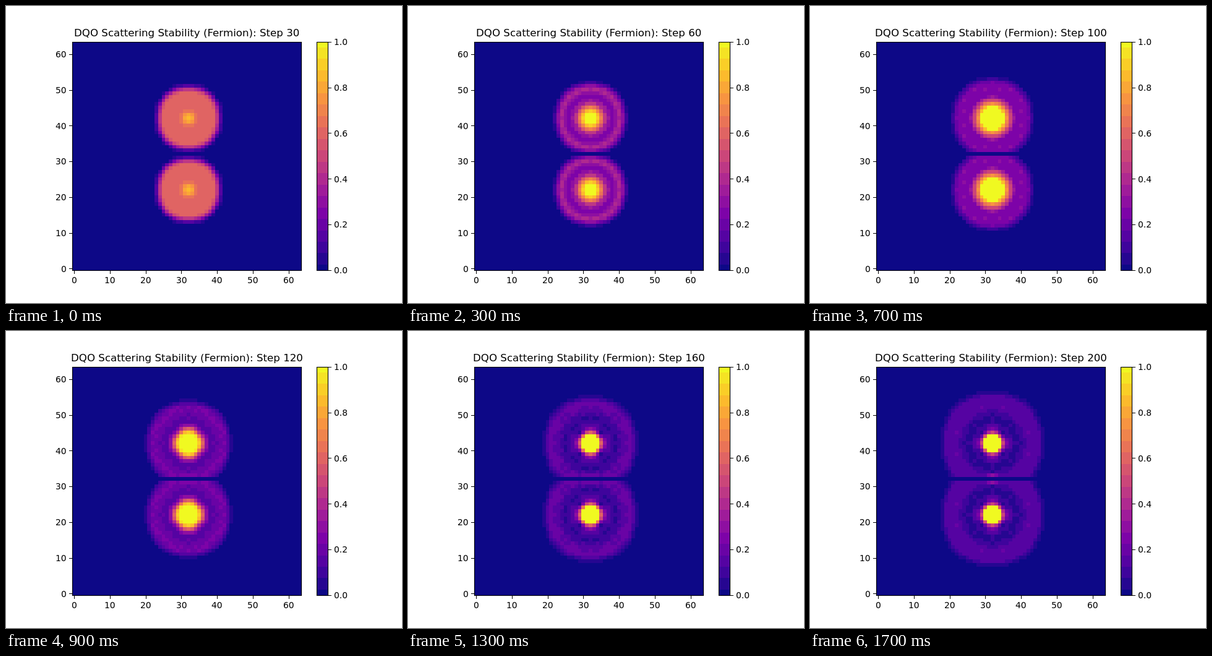
These frames come from a looping animation (640x480 px, 1.8 s). An HTML page with a canvas:

```html
<!DOCTYPE html>
<html lang="en">
<head>
<meta charset="utf-8">
<title>Scattering stability</title>
<style>
  html, body { margin: 0; width: 100%; height: 100%; overflow: hidden; background: #fff; }
  canvas { display: block; }
</style>
</head>
<body>
<canvas id="stage" width="640" height="480"></canvas>
<script>
const ctx = document.getElementById('stage').getContext('2d');
const LOOP = 1800, HOLD = 100, N = 64, LEVELS = 20;
const LEFT = 107.2, SIZE = 369.6, BOTTOM = 427.2;
const FONT = '"DejaVu Sans", sans-serif';

const PLASMA = ['0d0887', '4b03a1', '7d03a8', 'a82296', 'cb4679', 'e56b5d', 'f89441', 'fdc328', 'f0f921']
  .map(hex => [0, 2, 4].map(i => parseInt(hex.slice(i, i + 2), 16)));

const clamp = v => Math.min(1, Math.max(0, v));
const smooth = v => clamp(v) ** 2 * (3 - 2 * clamp(v));
const bell = v => Math.exp(-v * v);

function colour(value) {
  const v = Math.round(clamp(value) * LEVELS) / LEVELS * (PLASMA.length - 1);
  const i = Math.min(PLASMA.length - 2, Math.floor(v));
  return `rgb(${PLASMA[i].map((c, n) => Math.round(c + (PLASMA[i + 1][n] - c) * (v - i)))})`;
}

// The core swells quickly and shrinks slowly while the outer disc spreads and fades.
function poseAt(step) {
  const age = (step - 30) / 170;
  const u = Math.max(0, (step - 45) / 40);
  const swell = (u * Math.exp(1 - u)) ** 3;
  const late = clamp((step - 100) / 40);
  return {
    peak: .6 + .009 * step,
    core: 2.95 + 2.5 * swell,
    disc: .16 + .44 * Math.exp((30 - step) / 50),
    edge: 10 + 5.2 * age,
    moat: .65 * (1 - swell) * clamp((step - 30) / 30),
    moatRadius: 6 + age,
    moatWidth: 1 + 1.5 * age,
    ripple: .025 * clamp(age * 3),
    flare: .1 * late,
    contact: .2 * late * Math.cos(Math.PI * (step - 140) / 60) ** 2,
  };
}

function amplitude(pose, col, row) {
  if (row === 32) return 0;
  const dx = Math.abs(col - 32), dy = Math.abs(row - (row > 32 ? 42 : 22));
  const r = Math.hypot(dx, dy);
  const reach = (dx ** 2.25 + dy ** 2.25) ** (1 / 2.25);
  const core = pose.peak * Math.exp(-Math.log(2 * pose.peak) * (r / pose.core) ** 2);
  const moat = 1 - pose.moat * bell((r - pose.moatRadius) / pose.moatWidth);
  const disc = pose.disc * moat * smooth((pose.edge - reach) / 3);
  let v = Math.max(core, disc);
  v += pose.flare * Math.cos(4 * Math.atan2(dy, dx)) * bell(r - 4);
  if (r > 5 && r < 11) v += pose.ripple * Math.cos(1.9 * dx) * Math.cos(1.9 * dy);
  if (Math.abs(row - 32) === 1) v += pose.contact * bell(dx / 1.6);
  return v;
}

// Labels sit on whole pixels; align is 0 for left, .5 for centre and 1 for right.
function text(string, x, y, align, size = 13.89) {
  ctx.font = `${size}px ${FONT}`;
  ctx.fillStyle = '#000';
  ctx.fillText(string, Math.round(x - ctx.measureText(string).width * align), Math.round(y));
}

function drawField(step) {
  const pose = poseAt(step);
  const cell = 370 / N;
  const xAt = col => Math.round(107 + cell * col);
  const yAt = row => Math.round(427 - cell * row);
  ctx.fillStyle = colour(0);
  ctx.fillRect(107, 58, 370, 369);
  for (let row = 0; row < N; row++) {
    for (let col = 0; col < N; col++) {
      const v = amplitude(pose, col, row);
      if (v < .025) continue;
      const x = xAt(col), y = yAt(row + 1);
      ctx.fillStyle = colour(v);
      ctx.fillRect(x, y, xAt(col + 1) - x, yAt(row) - y);
    }
  }
}

function drawBar() {
  const edge = level => Math.round(BOTTOM - SIZE * clamp(level / LEVELS));
  for (let i = 0; i <= LEVELS; i++) {
    const y = edge(i + .5);
    ctx.fillStyle = colour(i / LEVELS);
    ctx.fillRect(502, y, 18, edge(i - .5) - y);
  }
}

function drawAxes() {
  ctx.strokeStyle = '#000';
  ctx.lineWidth = 1.11;
  ctx.strokeRect(107.5, 58.5, 370, 369);
  ctx.strokeRect(502.5, 58.5, 18, 369);
  ctx.fillStyle = '#000';
  for (let n = 0; n <= 60; n += 10) {
    const offset = SIZE / N * (n + .5), x = LEFT + offset, y = BOTTOM - offset;
    ctx.fillRect(Math.round(x), 428, 1, 5);
    ctx.fillRect(102, Math.round(y), 5, 1);
    text(n, x, 448, .5);
    text(n, 97.5, y + 5.2, 1);
  }
  for (let i = 0; i <= 5; i++) {
    const y = BOTTOM - SIZE * i / 5;
    ctx.fillRect(521, Math.round(y), 5, 1);
    text((i / 5).toFixed(1), 530, y + 5.2, 0);
  }
}

function draw(time) {
  const step = 30 + 10 * Math.floor(time % LOOP / HOLD);
  ctx.fillStyle = '#fff';
  ctx.fillRect(0, 0, 640, 480);
  drawField(step);
  drawBar();
  drawAxes();
  text(`DQO Scattering Stability (Fermion): Step ${step}`, 292, 49, .5, 16.67);
}

const start = performance.now();
function tick() {
  draw(performance.now() - start);
  requestAnimationFrame(tick);
}
tick();
</script>
</body>
</html>
```
